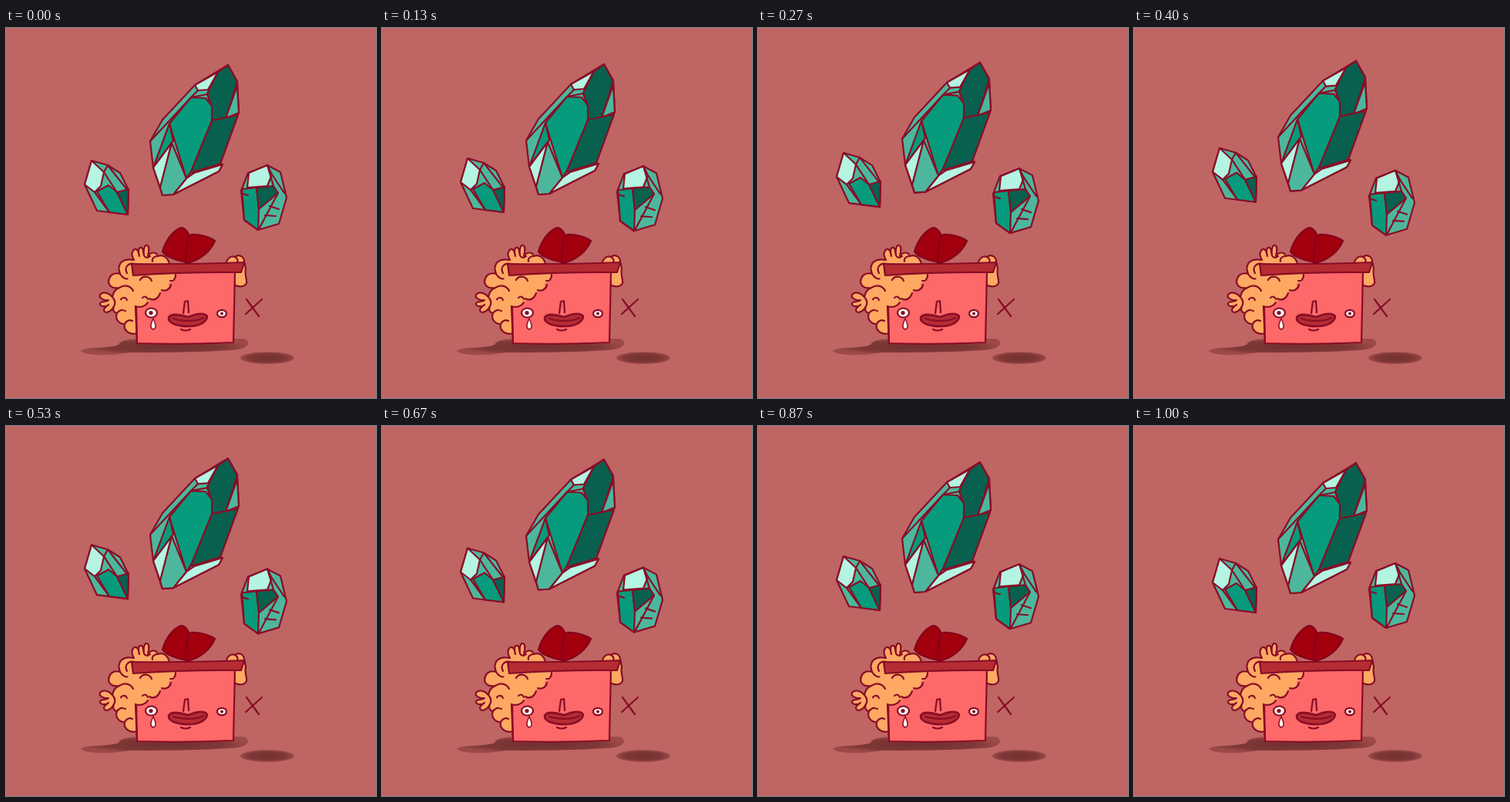
Recreate the animation shown at these times as an HTML page. Size 480 by 480 pixels, loop 1.07 s.

```html
<!DOCTYPE html>
<html>
<head>
<meta charset="utf-8">
<style>
html, body { margin: 0; width: 100%; height: 100%; overflow: hidden; background: #bf6564; }
svg { display: block; width: 100vw; height: 100vh; }
.line { fill: none; }
.hair { fill: #fda863; }
.white { fill: #b4f4e2; }
.light { fill: #4db79d; }
.green { fill: #069b7c; }
.dark { fill: #08604f; }
</style>
</head>
<body>
<svg viewBox="0 0 480 480" stroke="#880d26" stroke-width="2.2" stroke-linejoin="round" stroke-linecap="round">
  <defs>
    <radialGradient id="shade">
      <stop offset="0" stop-color="#713030"/>
      <stop offset=".7" stop-color="#7e3736"/>
      <stop offset="1" stop-color="#9c4a49"/>
    </radialGradient>
  </defs>

  <g stroke="none" fill="url(#shade)">
    <path d="M97 419C101 413 136 416 146 411C150 403 165 403 190 403L308 403C319 407 316 417 292 418C244 421 190 421 160 421C140 425 104 426 97 419Z"/>
    <ellipse cx="339" cy="428" rx="35" ry="7.8"/>
  </g>

  <!-- hair behind the box -->
  <path class="hair" d="M166 301C162 294 163 289 167 287C171 286 172 291 173 296C171 288 172 284 176 285C178 286 178 291 179 295C178 286 180 281 183 282C187 283 185 291 184 296C188 290 195 290 197 296C204 293 210 298 212 306L215 320L180 360L170 396C160 399 152 392 154 384C146 384 141 377 144 370C139 369 138 365 140 361C136 369 128 371 127 366C127 363 131 361 133 359C128 363 121 361 122 357C124 354 130 356 133 353C127 354 120 350 122 346C126 341 134 344 138 349C139 342 142 339 147 337C137 339 131 333 134 325C136 319 142 317 148 319C143 306 151 298 166 301Z"/>
  <path class="line" d="M148 319C151 324 156 327 162 325M167 306C158 304 153 311 157 318M179 295C180 298 184 299 187 296M197 296C192 296 189 299 190 303M138 349C142 353 142 358 140 361M144 370C147 366 151 365 155 367M154 384C156 380 160 378 164 380"/>

  <!-- hand on the right -->
  <path class="hair" d="M286 306C286 299 292 295 297 297C302 293 308 296 309 302L311 313C309 319 313 326 312 331C309 337 301 336 296 333L297 315Z"/>
  <path class="line" d="M297 297C301 299 301 302 300 305"/>

  <path fill="#fd6868" d="M168 317L297 316L295 408Q230 411 170 409Z"/>
  <path class="hair" stroke="none" d="M165 317L220 319C220 327 217 331 211 331C213 338 207 342 201 341C200 349 194 354 187 352C184 361 174 363 168 361L153 366L142 350L150 336Z"/>
  <path class="line" d="M220 320C220 326 217 329 213 328M214 333C213 339 207 342 202 340M200 344C197 352 191 354 186 351M184 356C180 362 173 363 168 361M174 327C177 321 186 321 189 328M147 337C155 332 162 335 165 341M149 352C152 348 156 350 157 353M177 350C180 347 183 349 184 352M168 362L170 409"/>

  <!-- band and bow -->
  <path fill="#b52c33" d="M163 306Q232 307 309 304L305 317Q235 316 165 321Z"/>
  <g fill="#a3000e" stroke="#81051b">
    <path d="M234 304C220 301 207 297 203 290C207 276 216 263 227 259C234 259 238 268 239 274Z"/>
    <path d="M233 305C233 294 234 274 240 268C250 267 264 271 271 276C266 288 253 302 233 305Z"/>
  </g>

  <!-- face -->
  <g fill="#fff4ec">
    <ellipse cx="188.5" cy="369.5" rx="7.5" ry="6"/>
    <ellipse cx="280" cy="370.5" rx="6" ry="4.6"/>
    <path d="M191 377C188 383 186 389 191 391C196 390 194 383 191 377Z" stroke-width="1.5"/>
  </g>
  <g fill="#880d26" stroke="none">
    <circle cx="188" cy="369.5" r="2.6"/>
    <circle cx="280" cy="370.5" r="2"/>
  </g>
  <path class="line" d="M230 370L232 355L236 354L237 369M227 391Q233 394 239 391M312 352L328 374M332 352L311 371"/>
  <path fill="#b52c33" stroke-width="2.6" d="M211 376C213 370 226 372 236 375C246 371 257 368 261 374C260 383 248 387 237 387C225 387 210 384 211 376Z"/>
  <path class="line" d="M217 377C226 380 246 382 256 376"/>

  <g class="gem" data-rise="-6">
    <path class="light" d="M288 48L300 69L302 110L296 122L278 176L281 177L276 186L217 216L203 217L191 181L187 147L203 119L245 74Z"/>
    <path class="white" d="M245 74L275 57L262 80L249 81Z"/>
    <path class="dark" d="M275 57L288 48L300 70L285 117L267 120L266 100L261 85Z"/>
    <path class="light" d="M300 75L302 110L285 117Z"/>
    <path class="dark" d="M267 120L301 113L278 176L239 188Z"/>
    <path class="green" d="M240 90L259 91L267 101L267 120L240 186L234 195L212 124Z"/>
    <path class="green" d="M212 124L217 146L191 181Z"/>
    <path class="white" d="M215 149L191 181L200 207Z"/>
    <path class="white" d="M281 177L276 186L217 216L234 195L244 188Z"/>
    <path class="light" d="M215 149L234 195L217 216L203 217L200 207Z"/>
    <path class="line" d="M249 81L240 90L187 147M240 90L261 86L266 100"/>
  </g>

  <g class="gem" data-rise="-18">
    <path class="light" d="M111 172L132 178L148 188L159 210L158 242L118 237L102 203Z"/>
    <path class="white" d="M111 172L127 187L123 205L115 213L102 203Z"/>
    <path class="green" d="M118 212L133 204L144 213L158 242L134 239Z"/>
    <path class="dark" d="M144 213L159 209L158 242Z"/>
    <path class="line" d="M127 187L144 213M127 187L132 178L158 211M115 213L134 239"/>
  </g>

  <g class="gem" data-rise="7.5">
    <path class="light" d="M339 178L356 187L364 220L354 254L327 262L309 249L305 211L314 188Z"/>
    <path class="green" d="M306 209L325 207L328 235L327 262L309 249Z"/>
    <path class="white" d="M315 188L339 178L345 190L339 205L313 207Z"/>
    <path class="dark" d="M325 207L347 205L353 214L328 235Z"/>
    <path class="line" d="M339 178L347 205M345 190L361 214M353 214L328 261M307 215L314 217M342 231L354 235M336 243L350 244"/>
  </g>
</svg>
<script>
const gems = document.querySelectorAll(".gem");
const LOOP = 1070, FRAME = 1000 / 15, LAST = 15;
const LEAD = 3.5; // frame changes fall on whole hundredths of a second
const start = performance.now();

function draw() {
  const time = (performance.now() - start) % LOOP;
  const step = Math.min(Math.floor((time + LEAD) / FRAME), LAST);
  const lift = (1 - Math.cos(2 * Math.PI * step / LAST)) / 2;
  for (const gem of gems) {
    gem.setAttribute("transform", `translate(0 ${gem.dataset.rise * lift})`);
  }
  requestAnimationFrame(draw);
}
draw();
</script>
</body>
</html>
```
